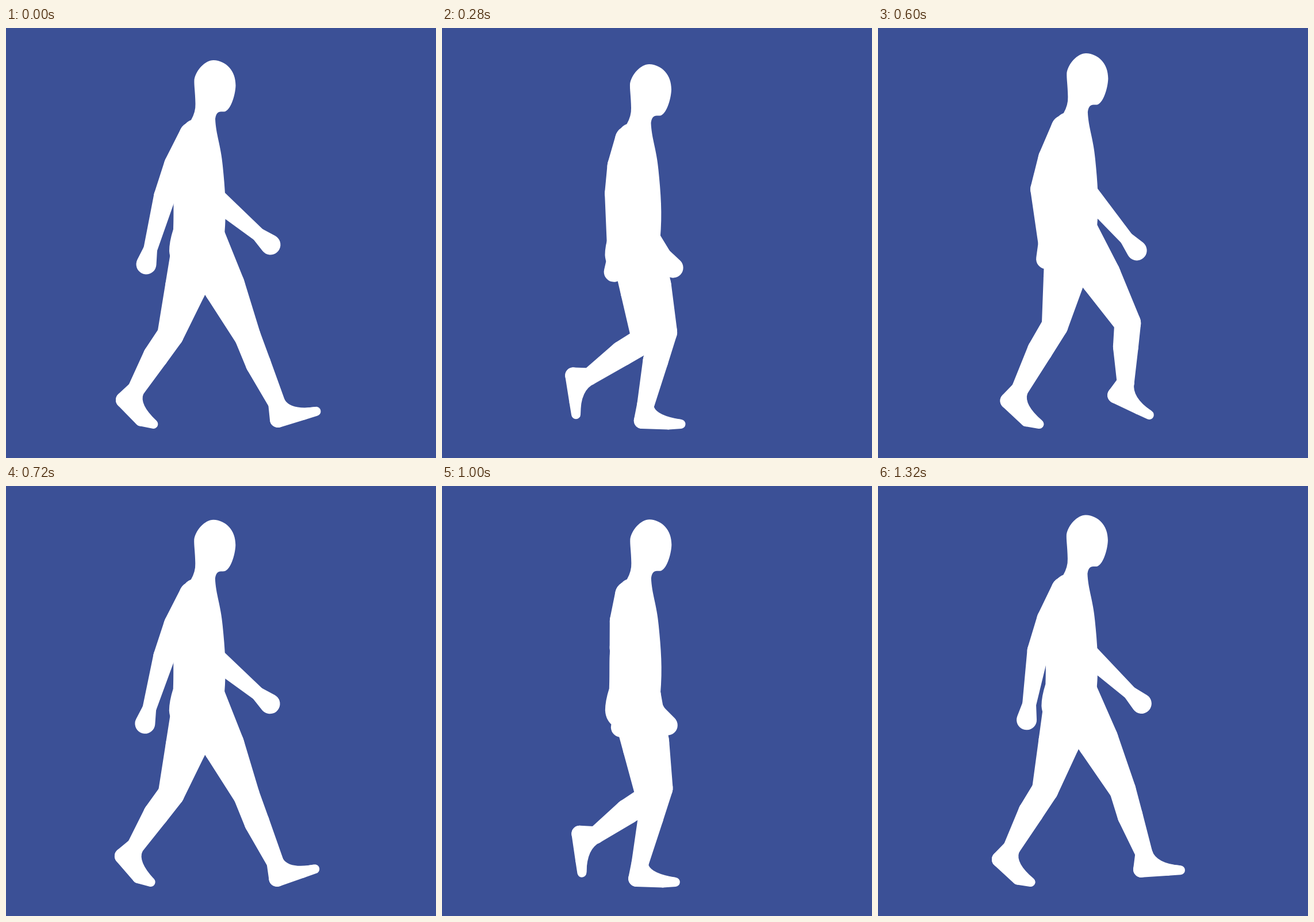
These frames come from a looping animation (748x748 px, 1360 ms). An HTML page with a canvas:

```html
<!DOCTYPE html>
<html lang="en">
<head>
<meta charset="utf-8">
<title>Walking figure</title>
<style>
  html, body { margin: 0; width: 100%; height: 100%; overflow: hidden; background: #3b5096; }
  canvas { display: block; width: 100%; height: 100%; }
</style>
</head>
<body>
<canvas id="stage" width="748" height="748"></canvas>
<script>
const ctx = document.getElementById('stage').getContext('2d');
const CYCLE = 1360, FIRST_STEP = 700, TICK = 40;
const { PI, sin, cos, hypot, min, max } = Math;

// Closed paths through eight evenly spaced poses of one stride:
// contact, down, passing, up - first as the leading limb, then as the trailing one.
const KNEE = [[420, 536], [404, 536], [372, 523], [332, 508], [286, 534], [333, 538], [369, 540], [435, 502]];
const HEEL = [[473, 681], [378, 683], [328, 682], [251, 650], [205, 647], [209, 609], [251, 605], [351, 609]];
const HAND = [[460, 377], [427, 413], [384, 415], [335, 399], [244, 411], [274, 432], [324, 416], [428, 399]];
const PITCH = [-12, 5, 7, 35, 41, 77, 86, 64].map(deg => [deg * PI / 180]);

const TORSO = new Path2D(
  'M322 160 Q330 146 329.5 132 C329 110 327 100 327.5 90 C330 74 346 56 361 56 ' +
  'C383 57 399.5 74 399.5 100 C399 118 390 144 380 145.5 C374 146 366 143 364 158 ' +
  'C365 185 374 205 377 240 C381 280 384 315 380 360 L372 390 L340 425 ' +
  'Q286 425 284 388 Q284 372 291 350 C292 330 291 300 292 290 ' +
  'C294 240 298 190 310 170 Q314 163 322 160Z');

const clamp01 = v => max(0, min(1, v));
const point = (x, y) => ({ x, y });
const mix = (p, q, k) => point(p.x + (q.x - p.x) * k, p.y + (q.y - p.y) * k);
const shift = (p, v, k) => point(p.x + v.x * k, p.y + v.y * k);

// Unit vector towards the front side of the segment p-q.
function normal(p, q) {
  const d = hypot(q.x - p.x, q.y - p.y);
  return point((q.y - p.y) / d, (p.x - q.x) / d);
}

// Smooth closed curve through the poses; a stride is two steps long.
function follow(poses, phase) {
  const n = poses.length, at = (phase / 2 % 1) * n;
  const i = Math.floor(at), u = at - i;
  const [a, b, c, d] = [-1, 0, 1, 2].map(k => poses[(i + k + n) % n]);
  return b.map((_, k) => b[k] + u / 2 * (c[k] - a[k]
    + u * (2 * a[k] - 5 * b[k] + 4 * c[k] - d[k]
    + u * (3 * (b[k] - c[k]) + d[k] - a[k]))));
}

// Filled hull of two circles.
function taper(p, r, q, s) {
  const d = hypot(q.x - p.x, q.y - p.y);
  const a = Math.atan2(q.y - p.y, q.x - p.x);
  const b = Math.acos(max(-1, min(1, (r - s) / d)));
  ctx.beginPath();
  ctx.arc(p.x, p.y, r, a + b, a - b + 2 * PI);
  ctx.arc(q.x, q.y, s, a - b, a + b);
  ctx.fill();
}

function drawFoot(ankle, shin, heel, toe) {
  const up = normal(heel, toe);
  // The sole bends at the ball while the heel lifts off the ground.
  const bend = 9 * clamp01((toe.y - 674) / 14) * clamp01((toe.y - heel.y) / 40);
  const ball = shift(mix(heel, toe, 0.68), up, -bend);
  taper(ankle, 15, heel, 14);
  taper(heel, 14, ball, 10);
  taper(ball, 10, toe, 8);

  const front = shift(ankle, shin, 15);
  const instep = shift(mix(heel, toe, 0.38), up, 11);
  const tip = shift(toe, up, 8);
  ctx.beginPath();
  ctx.moveTo(heel.x, heel.y);
  ctx.lineTo(ankle.x, ankle.y);
  ctx.lineTo(front.x, front.y);
  ctx.quadraticCurveTo(instep.x, instep.y, tip.x, tip.y);
  ctx.lineTo(toe.x, toe.y);
  ctx.fill();
}

function drawLeg(phase, bob) {
  const hip = point(336, 365 + bob);
  const knee = point(...follow(KNEE, phase));
  const [heelX, heelY] = follow(HEEL, phase);
  const [pitch] = follow(PITCH, phase);
  const heel = point(heelX, min(683, heelY));
  const along = point(cos(pitch), sin(pitch)), up = point(sin(pitch), -cos(pitch));
  const toe = shift(heel, along, 68);
  toe.y = min(689, toe.y);
  const ankle = shift(shift(heel, along, 4), up, 28);

  const shin = normal(knee, ankle);
  const thigh = shift(mix(hip, knee, 0.5), normal(hip, knee), 2);
  const calf = shift(mix(knee, ankle, 0.4), shin, -2);
  taper(hip, 45, thigh, 36);
  taper(thigh, 36, knee, 23);
  taper(knee, 23, calf, 22);
  taper(calf, 22, ankle, 15);
  drawFoot(ankle, shin, heel, toe);
}

function drawArm(phase, bob) {
  const a = phase * PI;
  const shoulder = point(325, 187 + bob);
  const elbow = point(318 + 42 * cos(a) - 5 * sin(2 * a),
                      293 + bob + 10 * sin(a) - 5 * sin(3 * a));
  const hand = point(...follow(HAND, phase));
  const upper = mix(shoulder, elbow, 0.5);
  const wrist = mix(hand, elbow, 27 / hypot(hand.x - elbow.x, hand.y - elbow.y));
  taper(shoulder, 24, upper, 26);
  taper(upper, 26, elbow, 19);
  taper(elbow, 19, wrist, 12);
  taper(wrist, 12, hand, 17.5);
}

function drawTorso(bob) {
  ctx.save();
  ctx.translate(-bob / 14, bob);
  ctx.fill(TORSO);
  ctx.restore();
}

// Steps walked so far; the first step of a stride is slightly longer.
function stepPhase(time) {
  return time < FIRST_STEP
    ? time / FIRST_STEP
    : 1 + (time - FIRST_STEP) / (CYCLE - FIRST_STEP);
}

const start = performance.now();

function render() {
  const elapsed = max(0, performance.now() - start) % CYCLE;
  const phase = stepPhase(Math.floor(elapsed / TICK) * TICK);
  const bob = 15 * sin(2 * PI * phase + 0.07) - 1;
  ctx.fillStyle = '#3b5096';
  ctx.fillRect(0, 0, 748, 748);
  ctx.fillStyle = '#fff';
  for (const limb of [phase, phase + 1]) {
    drawLeg(limb, bob);
    drawArm(limb, bob);
  }
  drawTorso(bob);
  requestAnimationFrame(render);
}
render();
</script>
</body>
</html>
```
